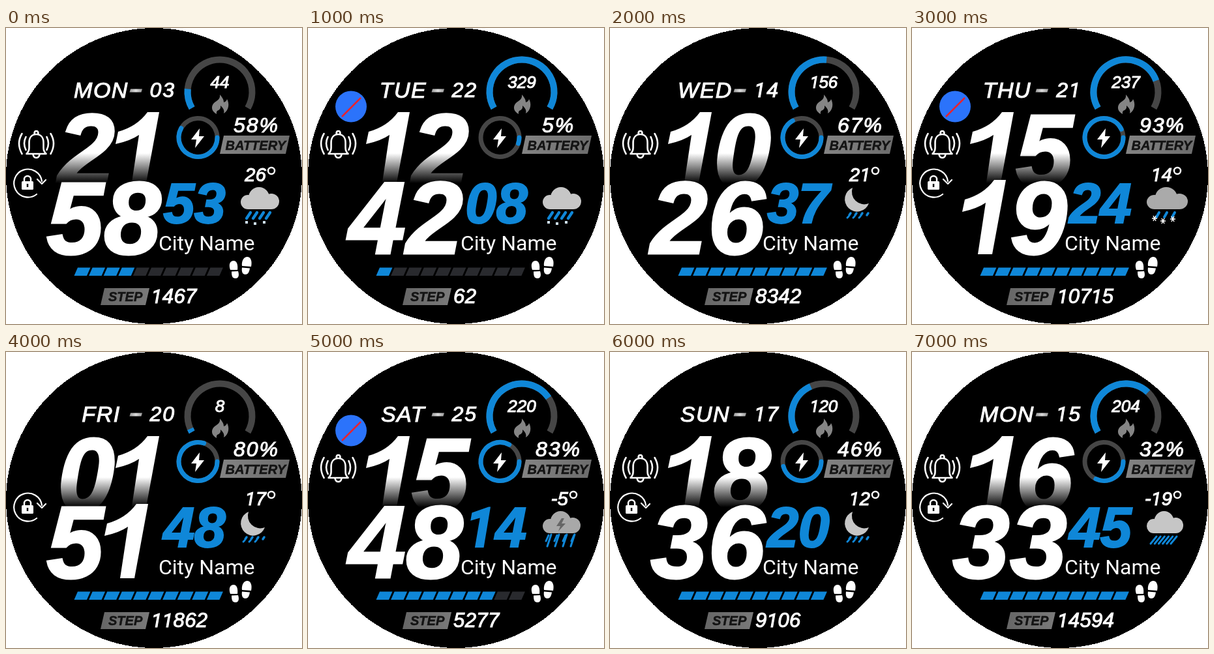
An HTML page for the animation above (8000 ms loop, 454x454 px).

```html
<!DOCTYPE html>
<html lang="en">
<head>
<meta charset="utf-8">
<title>Watch face</title>
<style>
html, body { margin: 0; width: 100%; height: 100%; overflow: hidden; background: #fff; }
svg { display: block; width: 100vw; height: 100vh; }
text { font-family: "Liberation Sans", Arial, sans-serif; font-style: italic; fill: #fff; }
.big { font-weight: 700; font-size: 158px; fill: inherit; stroke: inherit; stroke-width: 3px; }
.second { font-weight: 700; font-size: 87px; stroke-width: 2px; }
.num { stroke: #fff; stroke-width: 1.1px; }
.tag { font-weight: 700; fill: #141414; stroke: #141414; stroke-width: .5px; }
.line { fill: none; stroke: #fff; stroke-linecap: round; stroke-linejoin: round; }
</style>
</head>
<body>
<svg viewBox="0 0 454 454">
  <defs>
    <linearGradient id="fade" gradientUnits="userSpaceOnUse" x1="0" y1="192" x2="0" y2="238">
      <stop offset="0" stop-color="#fff"/><stop offset="1" stop-color="#000"/>
    </linearGradient>
    <linearGradient id="dash"><stop offset="0" stop-color="#999"/><stop offset=".5" stop-color="#ddd"/><stop offset="1" stop-color="#999"/></linearGradient>
    <linearGradient id="plate"><stop offset="0" stop-color="#666"/><stop offset=".5" stop-color="#8c8c8c"/><stop offset="1" stop-color="#6c6c6c"/></linearGradient>
    <path id="flake" d="M-4 0H4M-2 -4L2 4M2 -4L-2 4" stroke="#fff" stroke-width="1.5"/>
    <g id="cloud"><circle cx="371" cy="267" r="11"/><circle cx="388" cy="260" r="16"/><circle cx="407" cy="266" r="12"/><path d="M371 262H407V278H371Z"/></g>
  </defs>
  <circle cx="227" cy="227" r="227" shape-rendering="crispEdges"/>

  <g id="date"></g>
  <path d="M191 93.500H209L207.500 98.500H189.500Z" fill="url(#dash)"/>
  <g id="hour" fill="url(#fade)" stroke="url(#fade)"></g>
  <g id="minute" fill="#fff" stroke="#fff"></g>
  <g id="second"></g>
  <text x="234" y="341" style="font:32px Roboto,sans-serif">City Name</text>

  <g id="rings" fill="none"></g>
  <path d="M328 102C331 106 334 109 334 114Q338 113 339 109C343 116 342 126 334 131Q336 125 329 119Q330 125 324 127Q322 129 323 132C315 128 314 120 319 115C324 111 329 109 328 102Z" fill="#858585"/>
  <path d="M297 154L284 171H292L290 184L304 166H296Z" fill="#fff"/>
  <path d="M334 165H435L429 193H328Z M151 399H220L214 425H145Z" fill="url(#plate)"/>
  <text class="tag" x="336.500" y="186.500" font-size="20">BATTERY</text>
  <text class="tag" x="157" y="419" font-size="20">STEP</text>

  <g id="phone">
    <circle cx="66" cy="120.500" r="24" fill="#2b73fb"/>
    <path d="M52 136L81 107" stroke="#e8232f" stroke-width="2.500"/>
  </g>
  <g id="bell" class="line" stroke-width="2.600" transform="translate(.5 0)">
    <path d="M31 193H61Q57 189 57 184V176C57 167 52 163 46 163S35 167 35 176V184Q35 189 31 193ZM43 162Q43 158 46 158T49 162M41 194Q42 199 46 199T51 194"/>
    <path d="M30 167Q25 177 30 187M24 162Q15 177 24 193M62 167Q67 177 62 187M68 162Q77 177 68 193"/>
  </g>
  <g id="lock">
    <path class="line" stroke-width="2.200" d="M47 255A21.500 21.500 0 1 1 55 235M48 232L55 239L61 233"/>
    <path class="line" stroke-width="2.500" d="M28 236V232A5 5 0 0 1 38 232V236"/>
    <rect x="24" y="235" width="18" height="13" rx="1.500" fill="#fff"/>
    <path d="M33 239V244" stroke="#000" stroke-width="2.500"/>
  </g>
  <g id="sky"></g>
  <g id="bar"></g>
  <g fill="#fff">
    <path d="M344 371C341 362 344 357 349 357S356 363 355 371ZM346 373.500L356 373C358 379 357 384 352 384S346 380 346 373.500Z"/>
    <path d="M362 365C361 357 365 351 370 351S378 357 376 366ZM362 367.500L374 368.500C373 375 371 378 367 378S361 374 362 367.500Z"/>
  </g>
  <g id="read"></g>
</svg>
<script>
const BLUE = "#0f87d8";
const $ = id => document.getElementById(id);

// day, date, hour, minute, second, steps, bars lit, battery, calories, temperature, sky, icons
const scenes = [
  ["MON", "03", "21", "58", "53", 1467, 4, 58, 44, "26", "sleet", "bell lock"],
  ["TUE", "22", "12", "42", "08", 62, 1, 5, 329, "", "sleet", "phone bell"],
  ["WED", "14", "10", "26", "37", 8342, 10, 67, 156, "21", "night", "bell"],
  ["THU", "21", "15", "19", "24", 10715, 10, 93, 237, "14", "snow", "phone bell lock"],
  ["FRI", "20", "01", "51", "48", 11862, 10, 80, 8, "17", "night", "lock"],
  ["SAT", "25", "15", "48", "14", 5277, 8, 83, 220, "-5", "storm", "phone bell"],
  ["SUN", "17", "18", "36", "20", 9106, 10, 46, 120, "12", "night", "bell lock"],
  ["MON", "15", "16", "33", "45", 14594, 10, 32, 204, "-19", "rain", "bell lock"]
];

// a figure one without a foot
const plain = s => String(s).replace(/1/g, '<tspan style="font-family:Roboto,sans-serif;font-size:.968em">1</tspan>');

const num = (s, x, y, size, gap, anchor) =>
  `<text class="num" x="${x}" y="${y}" font-size="${size}" letter-spacing="${gap}" text-anchor="${anchor}">${plain(s)}</text>`;

// two large digits; the narrow one has its own left edges
const pair = (s, y, wide, narrow) => [...s].map((c, i) => c === "1"
  ? `<path stroke="none" d="M${narrow[i] + 24} ${y}h22l21 -114h-18q-16 22 -45 30l-4 19q23 -5 36 -14z"/>`
  : `<text class="big" x="${wide[i]}" y="${y - 1.5}">${c}</text>`).join("");

function arc(cx, cy, r, from, sweep, color, width, cap) {
  const at = deg => {
    const a = deg * Math.PI / 180;
    return `${cx + r * Math.cos(a)} ${cy + r * Math.sin(a)}`;
  };
  const end = from + Math.min(sweep, 359.9);
  return `<path d="M${at(from)}A${r} ${r} 0 ${+(sweep > 180)} 1 ${at(end)}" stroke="${color}" stroke-width="${width}" stroke-linecap="${cap}"/>`;
}

const cloud = (color, scale = 1) =>
  `<use href="#cloud" fill="${color}" transform="translate(360 244) scale(${scale} 1) translate(-360 -244)"/>`;

function drops(n, x, y, step, dx, dy, width) {
  let d = "";
  for (let i = 0; i < n; i++) d += `M${x + i * step} ${y}l${dx} ${dy}`;
  return `<path d="${d}" stroke="${BLUE}" stroke-width="${width}" stroke-linecap="round"/>`;
}

const flakes = list => list.map(([x, y]) => `<use href="#flake" x="${x}" y="${y}"/>`).join("");

const skies = {
  sleet: cloud("#c6c6c6") + drops(4, 375, 283, 10, -6, 9, 4.4) +
    '<path d="M367 298h4M380 300h4M394 298h4" stroke="#cfe3f3" stroke-width="4"/>',
  snow: cloud("#aaa", 1.068) + drops(3, 379, 283, 12, -4, 7, 4) +
    flakes([[372, 292], [385, 296], [400, 293]]),
  night: '<path d="M372 245A19 19 0 1 0 397 269A19 19 0 0 1 372 245Z" fill="#c6c6c6"/>' +
    drops(4, 369, 284, 9, -2, 3, 3.5) + drops(3, 366, 289, 9, -2, 2, 3),
  storm: drops(4, 373, 280, 12, -6, 18, 3) + drops(4, 369, 281, 13, -4, 9, 3) + cloud("#a8a8a8", .983) +
    '<path d="M389 255L381 267H387L384 275L395 263H389L393 255Z" fill="#666"/>',
  rain: cloud("#c6c6c6", .95) + drops(6, 375, 283, 6.2, -9, 11, 3)
};

function bar(lit) {
  let out = "";
  for (let i = 0; i < 10; i++) {
    out += `<path d="M${110 + i * 22.6} 367.500h19.500l-5.500 12.500h-19.500z" fill="${i < lit ? BLUE : "#292a2e"}"/>`;
  }
  return out;
}

function show([day, date, hour, minute, second, steps, lit, power, burn, temp, sky, icons]) {
  $("date").innerHTML = num(day, 146, 107, 34, 1.5, "middle") + num(date, 260, 106, 32, 2, "end");
  $("hour").innerHTML = pair(hour, 243, [79, 159], [89, 168]);
  $("minute").innerHTML = pair(minute, 347, [62, 150], [77, 151]);
  $("second").innerHTML = `<text class="second" x="241" y="299" letter-spacing="-1" style="fill:${BLUE};stroke:${BLUE}">${plain(second)}</text>`;
  $("rings").innerHTML =
    arc(328, 98, 49.5, 150, 240, "#464646", 10, "butt") +
    arc(328, 98, 49.5, 150, Math.min(burn / 300, 1) * 240, BLUE, 10, "butt") +
    arc(294.5, 168, 29.5, 0, 360, "#464646", 7, "round") +
    arc(294.5, 168, 29.5, 0, power * 3.6, BLUE, 7, "round");
  $("sky").innerHTML = skies[sky];
  $("bar").innerHTML = bar(lit);
  $("read").innerHTML =
    num(burn, 328, 92, 26, 0, "middle") +
    num(power + "%", 384, 160, 32, 2, "middle") +
    num(steps, 223, 422, 31, .4, "start") +
    (temp && num(temp, 399.5, 235, 29, .5, "end") +
      '<circle cx="407" cy="219" r="5" fill="none" stroke="#fff" stroke-width="2.500"/>');
  for (const id of ["phone", "bell", "lock"]) {
    $(id).style.display = icons.includes(id) ? "" : "none";
  }
}

let start, last = -1;
function tick(now) {
  start ??= now;
  const i = Math.floor((now - start) / 1000) % scenes.length;
  if (i !== last) show(scenes[last = i]);
  requestAnimationFrame(tick);
}
show(scenes[0]);
requestAnimationFrame(tick);
</script>
</body>
</html>
```
